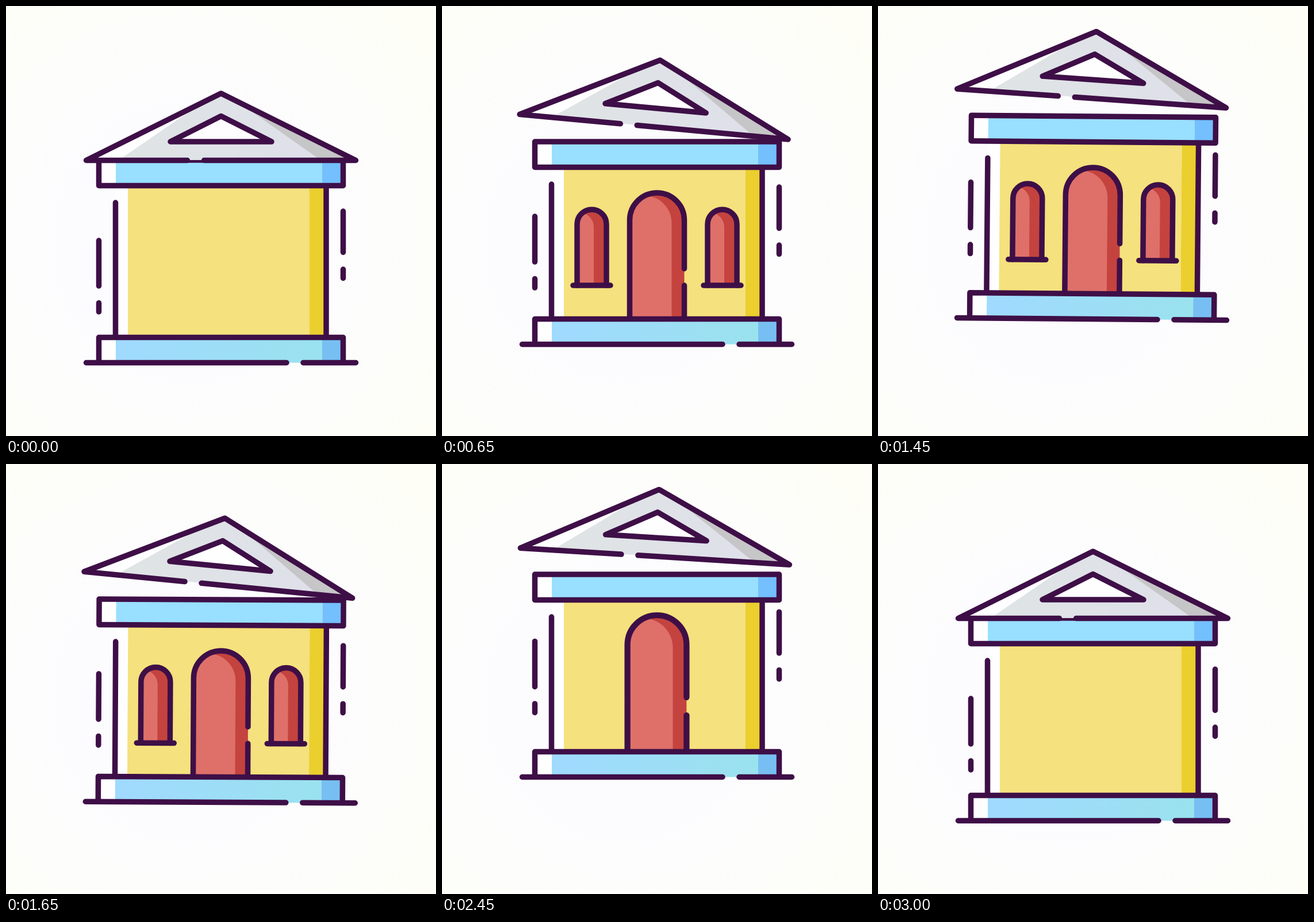
Write an HTML page with a canvas that moves like this. It is 748 px wide and 748 px high and loops after 3050 ms.

```html
<!DOCTYPE html>
<html lang="en">
<head>
<meta charset="utf-8">
<title>Hopping house</title>
<style>
html, body { margin: 0; width: 100%; height: 100%; overflow: hidden; background: #fcfcfe; }
canvas { display: block; width: 100vw; height: 100vh; }
</style>
</head>
<body>
<canvas id="stage" width="748" height="748"></canvas>
<script>
const ctx = document.getElementById('stage').getContext('2d');
const LOOP = 3050, STEP = 50, HOP = 1000, MID = 374;
const INK = '#3e0f47', PAPER = '#fefeff';

// Keys are [time, value] within one hop
const bodyKeys = [[0, 0], [50, -3], [100, 2], [200, 38], [300, 66], [400, 77], [450, 76],
  [550, 58], [650, 32], [750, 6], [850, -5], [1000, 0]];
const roofKeys = [[0, 0], [50, -3], [100, 6], [200, 57], [300, 95], [400, 109], [450, 107.7],
  [550, 78], [650, 58], [750, 36], [850, -5], [1000, 0]];
const swingKeys = [[0, 0], [100, -1], [200, -4.5], [300, -3], [450, 3.55],
  [570, 5.5], [680, 5], [770, 3], [850, 0], [1000, 0]];
const tiltKeys = [[0, 0], [250, 0.3], [450, 0.49], [650, 0.3], [850, 0], [1000, 0]];

// Smooth curve through the keys
function along(keys, t) {
  const last = keys.length - 1;
  if (t >= keys[last][0]) return keys[last][1];
  let i = 0;
  while (t >= keys[i + 1][0]) i++;
  const slope = k => {
    if (k === 0 || k === last) return 0;
    const a = keys[k - 1], b = keys[k + 1];
    return (b[1] - a[1]) / (b[0] - a[0]);
  };
  const [t0, v0] = keys[i], [t1, v1] = keys[i + 1], d = t1 - t0, u = (t - t0) / d;
  const w = u * u * (3 - 2 * u);
  return v0 + (v1 - v0) * w + d * u * (1 - u) * ((1 - u) * slope(i) - u * slope(i + 1));
}

function backIn(u) {
  const s = 1.9;
  u = Math.min(1, Math.max(0, u));
  return u * u * ((s + 1) * u - s);
}

function popScale(t, show, hide) {
  const span = 350;
  if (t < HOP) return 1 - backIn(1 - (t - show) / span);
  return 1 - backIn((t - hide) / span);
}

function line(...p) {
  ctx.beginPath();
  ctx.moveTo(p[0], p[1]);
  for (let i = 2; i < p.length; i += 2) ctx.lineTo(p[i], p[i + 1]);
  ctx.stroke();
}

function poly(color, ...p) {
  ctx.fillStyle = color;
  ctx.beginPath();
  for (let i = 0; i < p.length; i += 2) ctx.lineTo(p[i], p[i + 1]);
  ctx.closePath();
  ctx.fill();
}

function box(color, x0, y0, x1, y1) {
  ctx.fillStyle = color;
  ctx.fillRect(x0, y0, x1 - x0, y1 - y0);
}

function across(x0, x1, from, to) {
  const g = ctx.createLinearGradient(x0, 0, x1, 0);
  g.addColorStop(0, from);
  g.addColorStop(1, to);
  return g;
}

function turn(deg, x, y) {
  ctx.translate(x, y);
  ctx.rotate(deg * Math.PI / 180);
  ctx.translate(-x, -y);
}

function backdrop() {
  const g = ctx.createRadialGradient(320, 410, 230, 320, 410, 580);
  g.addColorStop(0, '#fcfcfe');
  g.addColorStop(1, '#fefef6');
  ctx.fillStyle = g;
  ctx.fillRect(0, 0, 748, 748);
}

function archPath(x, r, top, bottom) {
  const p = new Path2D();
  p.moveTo(x - r, bottom);
  p.lineTo(x - r, top + r);
  p.arc(x, top + r, r, Math.PI, 0);
  p.lineTo(x + r, bottom);
  return p;
}

function archFill(x, r, top, bottom) {
  const shape = archPath(x, r, top, bottom);
  ctx.fillStyle = '#c4433f';
  ctx.fill(shape);
  ctx.save();
  ctx.clip(shape);
  ctx.fillStyle = '#de7069';
  ctx.fill(archPath(x - 22, r, top + 5, bottom));
  ctx.restore();
}

function scaled(k, x, y, draw) {
  if (k <= 0.01) return;
  ctx.save();
  ctx.translate(x, y);
  ctx.scale(k, k);
  ctx.translate(-x, -y);
  draw();
  ctx.restore();
}

function door() {
  archFill(MID, 47.5, 357, 576);
  ctx.beginPath();
  ctx.moveTo(326.5, 576);
  ctx.lineTo(326.5, 404.5);
  ctx.arc(MID, 404.5, 47.5, Math.PI, 0);
  ctx.lineTo(421.5, 489);
  ctx.stroke();
  line(421.5, 518, 421.5, 576);
}

function pane(x) {
  archFill(x, 25.5, 386, 518);
  ctx.stroke(archPath(x, 25.5, 386, 518));
  line(x - 32.5, 518, x + 32.5, 518);
}

function walls() {
  box(PAPER, 190.5, 312, 212, 576);
  box('#f5e17d', 212, 312, 528, 576);
  box('#ebcf2e', 528, 312, 557, 576);
  line(190.5, 342, 190.5, 576);
  line(557, 312, 557, 576);
}

function beam() {
  box(PAPER, 161.5, 268, 191, 312);
  box('#99dfff', 191, 268, 550, 312);
  box('#74bffe', 550, 268, 586.5, 312);
  ctx.strokeRect(161.5, 268, 425, 44.5);
}

function base() {
  box(PAPER, 161.5, 576, 191, 620);
  box(across(191, 550, '#a0daff', '#9ae2ee'), 191, 576, 550, 620.5);
  box('#77bff2', 550, 576, 586.5, 620);
  line(161.5, 620, 161.5, 576.5, 586.5, 576.5, 586.5, 620);
  line(139.5, 620.5, 488, 620.5);
  line(517, 620.5, 608.5, 620.5);
}

function dashes() {
  line(161.5, 408, 161.5, 487);
  line(161.5, 516.5, 161.5, 532);
  line(586.5, 357, 586.5, 428.5);
  line(586.5, 458, 586.5, 473.5);
}

function roof() {
  poly(PAPER, 140, 268, MID, 152, 608, 268);
  poly(across(196, 547, '#dfe4e4', '#dfe0ea'), 196, 268, 342, 168, MID, 152, 408, 169, 547, 268);
  poly('#c6c5c7', 547, 268, 404, 167, 608, 268);
  poly(PAPER, 286, 236, MID, 191.5, 462, 236);
  line(315.5, 268.5, 139.5, 268.5, MID, 152, 608.5, 268.5, 344.5, 268.5);
  ctx.beginPath();
  ctx.moveTo(286, 236);
  ctx.lineTo(MID, 191.5);
  ctx.lineTo(462, 236);
  ctx.closePath();
  ctx.stroke();
}

function draw(t) {
  const hop = t % HOP;
  const lift = along(bodyKeys, hop), roofLift = along(roofKeys, hop);
  const tilt = t >= HOP && t < 2 * HOP ? along(tiltKeys, hop) : 0;
  backdrop();
  ctx.strokeStyle = INK;
  ctx.lineWidth = 9.5;
  ctx.lineCap = ctx.lineJoin = 'round';

  ctx.save();
  ctx.translate(0, -lift);
  turn(tilt, MID, 386);
  ctx.save();
  ctx.translate(0, -0.31 * lift);
  dashes();
  ctx.restore();
  walls();
  scaled(popScale(t, 90, 2355), MID, 576, door);
  const k = popScale(t, 250, 2050);
  for (const x of [260.5, 487.5]) scaled(k, x, 518, () => pane(x));
  beam();
  base();
  ctx.translate(0, lift - roofLift);
  turn(along(swingKeys, hop), MID, 210);
  roof();
  ctx.restore();
}

const start = performance.now();
function tick() {
  const t = (performance.now() - start) % LOOP;
  draw(Math.floor(t / STEP) * STEP);
  requestAnimationFrame(tick);
}
tick();
</script>
</body>
</html>
```
